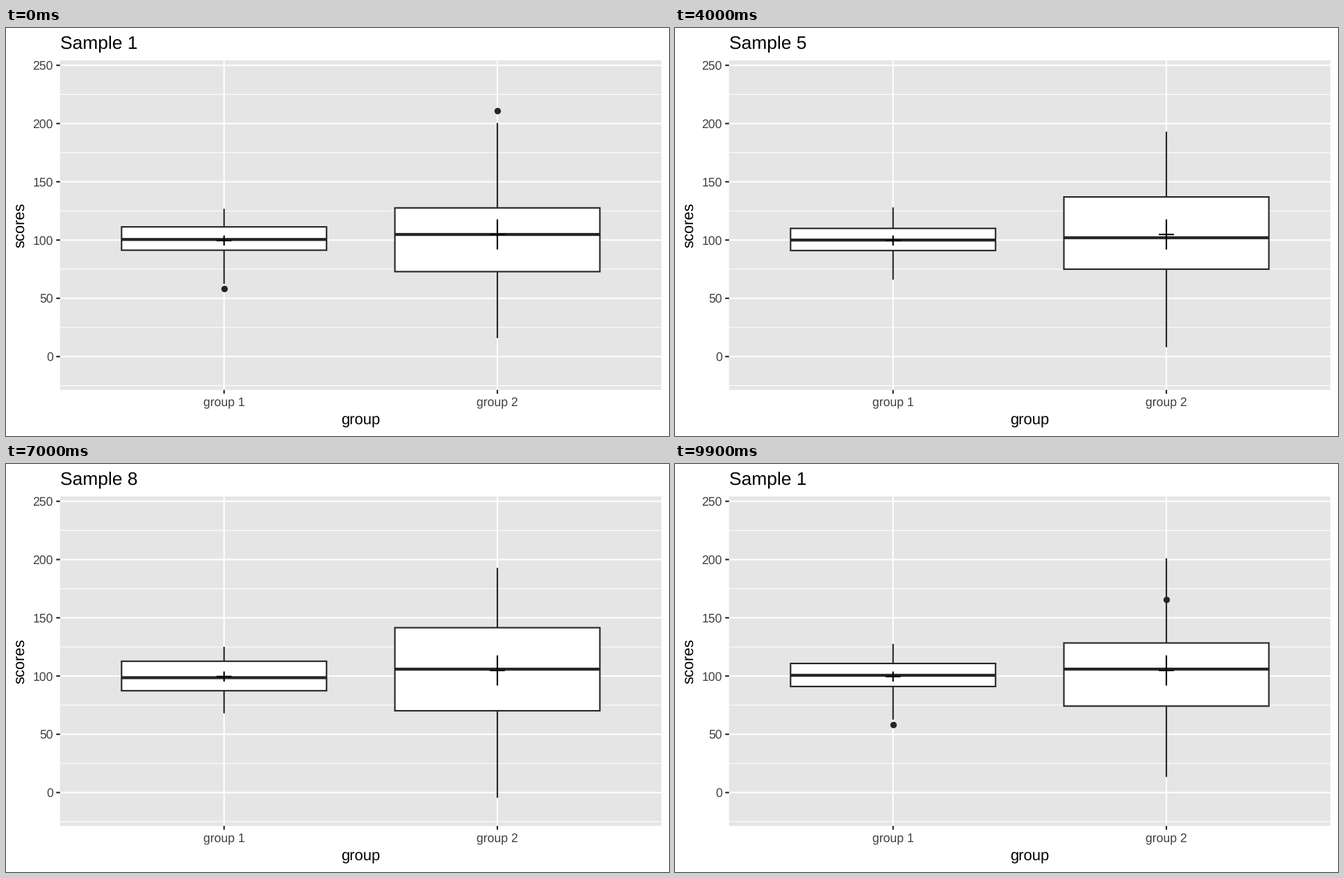
A matplotlib script for the animation above (10 s loop, 954 by 587 pixels).

```python
import numpy as np
import matplotlib.pyplot as plt
from matplotlib.animation import FuncAnimation
from matplotlib.patches import Rectangle

W, H, DPI = 954, 587, 72
LEFT, RIGHT, TOP, BOTTOM = 77.8, 943, 46.6, 520.7
UNIT = (RIGHT - LEFT) / 2.2
CENTERS = [LEFT + 0.6 * UNIT, LEFT + 1.6 * UNIT]
HALF = 0.375 * UNIT
INK, LABEL, PANEL = "#262626", "#404040", "#e5e5e5"
STEPS, HOLD = 10, 5

plt.rcParams.update({
    "font.family": "Liberation Sans",
    "path.snap": False,
    "text.hinting": "no_hinting",
    "lines.solid_capstyle": "butt",
})

# Per sample and group: low whisker, lower hinge, median, upper hinge, high whisker
BOXES = np.array([
    [[62.5, 91.3, 100.5, 111.3, 126.8], [15.8, 72.9, 104.8, 127.6, 200.5]],
    [[71.0, 92.0, 98.5, 107.1, 124.8], [47.2, 71.7, 100.3, 138.5, 202.5]],
    [[66.0, 91.0, 99.5, 108.5, 131.0], [-12.7, 75.0, 103.0, 135.0, 190.0]],
    [[63.8, 91.6, 99.7, 110.7, 128.3], [10.0, 77.4, 103.8, 134.8, 184.0]],
    [[66.0, 91.0, 100.0, 110.0, 128.0], [8.0, 75.0, 102.0, 137.0, 193.0]],
    [[65.6, 90.6, 101.3, 108.7, 127.4], [2.4, 74.3, 99.5, 142.3, 196.3]],
    [[67.0, 90.0, 100.0, 110.0, 127.0], [-6.0, 73.0, 103.0, 139.0, 194.0]],
    [[68.0, 87.4, 98.6, 112.7, 125.1], [-4.5, 70.2, 105.9, 141.5, 192.8]],
    [[69.8, 92.1, 101.3, 108.9, 127.8], [-7.8, 75.2, 103.8, 134.9, 191.9]],
    [[63.0, 90.0, 101.3, 108.8, 131.0], [3.9, 79.5, 110.5, 131.5, 203.0]],
])
OUTLIERS = [
    ([58.2], [211]),
    ([136, 131, 131], []),
    ([139, 138, 59.5], [241, 238]),
    ([], [-10.6]),
    ([], []),
    ([60.2], []),
    ([], []),
    ([], []),
    ([136.5], []),
    ([], [-16]),
]
# Start value for outliers that fly in from elsewhere, by (sample, group)
ENTRY = {(1, 1): 7.5}
MEANS = [(99.6, 4.3), (104.8, 12.9)]


def ypos(value):
    return 472.7 - 1.6762 * np.asarray(value)


fig = plt.figure(figsize=((W + 1e-4) / DPI, (H + 1e-4) / DPI), dpi=DPI,
                 facecolor="white")
ax = fig.add_axes([0, 0, 1, 1])
ax.set_xlim(0, W)
ax.set_ylim(H, 0)
ax.axis("off")


def line(x, y, color, width, z):
    return ax.plot(x, y, color=color, lw=width, zorder=z)[0]


def text(x, y, s, size, color="black", **kw):
    kw = {"ha": "center", "va": "baseline", **kw}
    return ax.text(x, y, s, fontsize=size, color=color, **kw)


def draw_axes():
    ax.add_patch(Rectangle((LEFT, TOP), RIGHT - LEFT, BOTTOM - TOP,
                           fc=PANEL, ec="none", zorder=0))
    for v in range(-25, 251, 50):
        line([LEFT, RIGHT], [ypos(v)] * 2, "white", 1.07, 1)
    for v in range(0, 251, 50):
        y = ypos(v)
        line([LEFT, RIGHT], [y, y], "white", 2.13, 1)
        line([LEFT - 5.5, LEFT], [y, y], INK, 2.13, 1)
        text(LEFT - 9.9, y + 6.3, str(v), 17.6, LABEL, ha="right")
    for i, x in enumerate(CENTERS):
        line([x, x], [TOP, BOTTOM], "white", 2.13, 1)
        line([x, x], [BOTTOM, BOTTOM + 5.5], INK, 2.13, 1)
        text(x, 544.4, f"group {i + 1}", 17.6, LABEL)
    text((LEFT + RIGHT) / 2, 570.6, "group", 22)
    text(27, (TOP + BOTTOM) / 2, "scores", 22, rotation=90,
         rotation_mode="anchor")


class Box:
    def __init__(self, x, mean, spread):
        self.x = x
        self.dots = ax.plot([], [], "o", ms=9.3, color=INK, mew=0, zorder=2)[0]
        self.whiskers = [line([x, x], [0, 0], INK, 2.13, 3) for _ in range(2)]
        self.body = ax.add_patch(Rectangle((x - HALF, 0), 2 * HALF, 0,
                                           fc="white", ec=INK, lw=2.13,
                                           zorder=4))
        self.median = line([x - HALF, x + HALF], [0, 0], INK, 4.27, 5)
        line([x, x], ypos([mean - spread, mean + spread]), "black", 2.13, 6)
        line([x - 10.8, x + 10.8], [ypos(mean)] * 2, "black", 2.13, 6)

    def update(self, stats, outliers):
        low, q1, mid, q3, high = ypos(stats)
        self.whiskers[0].set_ydata([high, q3])
        self.whiskers[1].set_ydata([q1, low])
        self.body.set_y(q3)
        self.body.set_height(q1 - q3)
        self.median.set_ydata([mid, mid])
        self.dots.set_data([self.x] * len(outliers), ypos(outliers))


def blend_outliers(sample, after, group, t):
    a, b = OUTLIERS[sample][group], OUTLIERS[after][group]
    if t == 0 or not (a or b):
        return a
    n = max(len(a), len(b))
    a = a or [ENTRY.get((sample, group), np.mean(b))]
    b = b or [np.mean(a)]
    return (1 - t) * np.resize(a, n) + t * np.resize(b, n)


draw_axes()
title = text(LEFT, 30.8, "", 26.4, ha="left")
boxes = [Box(x, *m) for x, m in zip(CENTERS, MEANS)]


def update(frame):
    sample, step = divmod(frame, STEPS)
    t = max(0, step - HOLD) / (STEPS - HOLD)
    after = (sample + 1) % len(BOXES)
    stats = (1 - t) * BOXES[sample] + t * BOXES[after]
    title.set_text(f"Sample {(sample if t < 0.5 else after) + 1}")
    for g, box in enumerate(boxes):
        box.update(stats[g], blend_outliers(sample, after, g, t))
    return []


anim = FuncAnimation(fig, update, frames=len(BOXES) * STEPS, interval=100,
                     repeat=True, repeat_delay=0)
plt.show()
```
